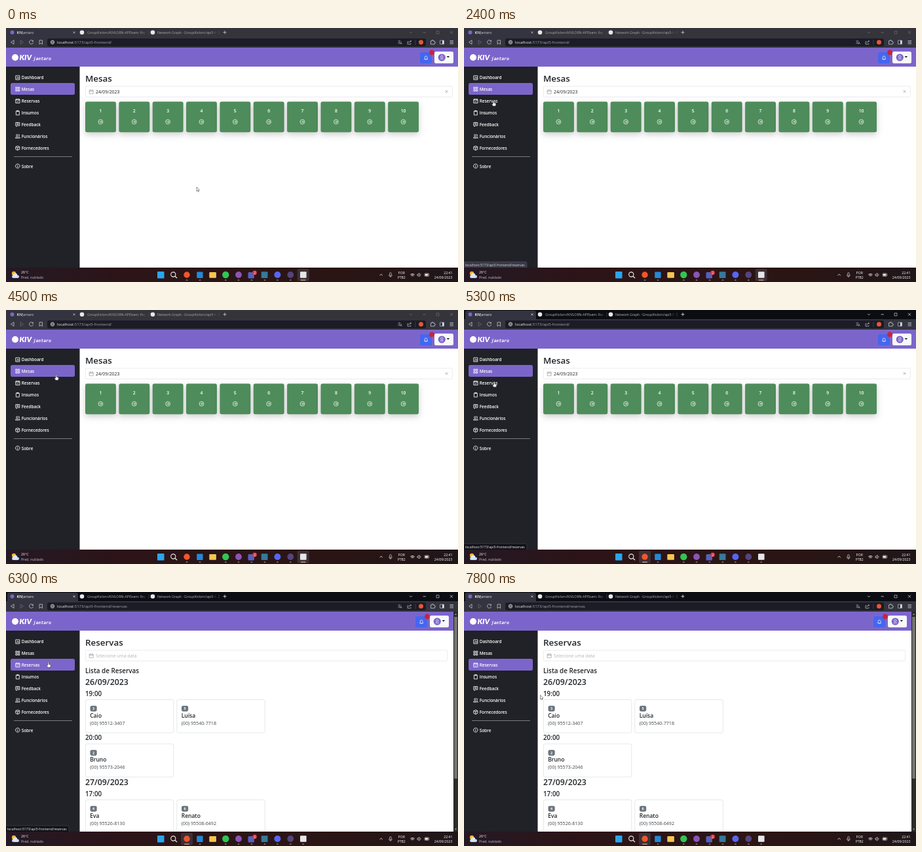
An HTML page with a canvas that plays this animation: 690 px wide and 388 px high, repeating every 8 s.

```html
<!DOCTYPE html>
<html lang="pt-BR">
<head>
<meta charset="utf-8">
<style>
html, body { margin: 0; width: 100%; height: 100%; overflow: hidden; background: #fff; }
canvas { display: block; width: 690px; height: 388px; }
</style>
</head>
<body>
<canvas id="stage"></canvas>
<script>
const W = 690, H = 388, LOOP = 8000, STEP = 100;
const PURPLE = '#7c65ca', DARK = '#212529', GREEN = '#4f8c5b';
const canvas = document.getElementById('stage');
const ratio = window.devicePixelRatio || 1;
canvas.width = W * ratio;
canvas.height = H * ratio;
const c = canvas.getContext('2d');

// Cursor path: time, x, y
const PATH = [
  [0, 291, 243], [400, 287, 224], [900, 272, 163], [1500, 27.5, 118], [1800, 21, 115],
  [2400, 45, 111], [3200, 45, 111], [3600, 129.5, 106.5], [4000, 148, 117], [4200, 148, 117],
  [4500, 76.5, 99], [5100, 46, 109.5], [5300, 46, 109.5], [5600, 64.5, 107], [6300, 64.5, 107],
  [7100, 158, 142], [7800, 116.5, 157.5]
];

const MENU = [
  ['Dashboard', 'M.5 1h6v6h-6zM2 5.5v-1M3.5 5.5v-3M5 5.5v-2'],
  ['Mesas', 'M.5.5h2.3v2.3H.5zM4.2.5h2.3v2.3H4.2zM.5 4.2h2.3v2.3H.5zM4.2 4.2h2.3v2.3H4.2z'],
  ['Reservas', 'M.5 1h6.2v5.7H.5zM.5 2h6.2M2 0v1M5 0v1M2.2 4.2l1 1 1.8-1.8'],
  ['Insumos', 'M1 1h5v6H1zM2.3.4h2.4v1H2.3z'],
  ['Feedback', 'M.5.5h6v4.7H3L1.5 6.8V5.2h-1zM2 2h3M2 3.5h3'],
  ['Funcionários', 'M2.5 3a1.2 1.2 0 1 0-.01 0M.3 6.3q0-2.2 2.2-2.2t2.2 2.2zM5 3a1.1 1.1 0 1 0-.4-2.1M5.3 4.1q1.6.2 1.6 2.2H5.5'],
  ['Fornecedores', 'M3.5.3l3 1.3v3.8l-3 1.4-3-1.4V1.6zM.5 1.6l3 1.3 3-1.3M3.5 2.9v3.9'],
  ['Sobre', 'M3.5.3a3.2 3.2 0 1 0 .01 0M3.5 3v2.3M3.5 1.7v.6']
].map(([label, d], i) => ({ label, icon: new Path2D(d), y: i === 7 ? 211 : 75.5 + i * 18 }));

const BOOKINGS = [
  [121, 164.5, 3, 'Caio', '(00) 95512-3407'], [260.5, 164.5, 5, 'Luísa', '(00) 95540-7718'],
  [121, 232, 2, 'Bruno', '(00) 95573-2046'],
  [121, 317.5, 4, 'Eva', '(00) 95526-8130'], [260.5, 317.5, 6, 'Renato', '(00) 95508-6492']
];

const ICONS = {
  calendar: new Path2D('M0 1h6v5.4H0zM0 2.8h6M1.6 0v1.6M4.4 0v1.6'),
  back: new Path2D('M4.5 0v6L0 3z'),
  forward: new Path2D('M0 0v6l4.5-3z'),
  reload: new Path2D('M5.7 1.5A3 3 0 1 0 6 3.6M5.9 0v1.8H4'),
  bookmark: new Path2D('M0 0h4.5v6L2.2 4.3 0 6z'),
  share: new Path2D('M1.5 2H0v4h5V4.5M2 4q.3-2.5 3.5-2.7M4.2 0l1.5 1.3-1.5 1.3'),
  puzzle: new Path2D('M0 1.5h1.7a1 1 0 1 1 1.8 0h2v1.7a1 1 0 1 1 0 1.6v1.7H0z'),
  bell: new Path2D('M0 5.2l.8-1V2.4a1.9 1.9 0 0 1 3.8 0v1.8l.8 1zM2 6h1.5'),
  hand: new Path2D('M-.9 0Q0-.7.8 0V3.3L3.6 4Q4 4.3 3.9 5.2L3.2 8.3H-.7L-2.6 5.4Q-2.6 4.4-.9 5.3z'),
  arrow: new Path2D('M0 0V6.4L1.5 5.1 2.5 7.3 3.5 6.8 2.5 4.8H4.4z')
};

function rect(x, y, w, h, fill, r = 0, stroke) {
  c.beginPath();
  c.roundRect(x, y, w, h, r);
  if (fill) { c.fillStyle = fill; c.fill(); }
  if (stroke) { c.strokeStyle = stroke; c.lineWidth = .6; c.stroke(); }
}

function dot(x, y, r, fill) {
  c.beginPath();
  c.arc(x, y, r, 0, 7);
  c.fillStyle = fill;
  c.fill();
}

function ring(x, y, r, color, width = .7) {
  c.beginPath();
  c.arc(x, y, r, 0, 7);
  c.strokeStyle = color;
  c.lineWidth = width;
  c.stroke();
}

function text(s, x, y, size, color, { weight = 400, align = 'left', family = '"Open Sans", sans-serif' } = {}) {
  c.font = `${weight} ${size}px ${family}`;
  c.textAlign = align;
  c.fillStyle = color;
  c.fillText(s, x, y);
  return x + c.measureText(s).width;
}

function line(color, width, ...p) {
  c.beginPath();
  for (let i = 0; i < p.length; i += 2) c.lineTo(p[i], p[i + 1]);
  c.strokeStyle = color;
  c.lineWidth = width;
  c.stroke();
}

function cross(x, y, r, color) {
  line(color, .7, x - r, y - r, x + r, y + r);
  line(color, .7, x + r, y - r, x - r, y + r);
}

function icon(path, x, y, color, { fill, width = .7 } = {}) {
  c.save();
  c.translate(x, y);
  if (fill) { c.fillStyle = fill; c.fill(path); }
  c.strokeStyle = color;
  c.lineWidth = width;
  c.stroke(path);
  c.restore();
}

function clippedText(s, x, width, color, bg) {
  c.save();
  c.beginPath();
  c.rect(x, 0, width, 14);
  c.clip();
  text(s, x, 8.8, 5.2, color);
  const fade = c.createLinearGradient(x + width - 8, 0, x + width, 0);
  fade.addColorStop(0, bg + '00');
  fade.addColorStop(1, bg);
  rect(x + width - 8, 0, 8, 14, fade);
  c.restore();
}

function drawBrowser(focused, url) {
  const strip = focused ? '#0c0c13' : '#35343a', bar = '#33343f';
  const bright = focused ? '#f2f2f5' : '#d4d4da', dim = focused ? '#b9b9c2' : '#a9a9b0';
  rect(0, 0, W, 14, strip);
  rect(2, 1, 108, 13, bar, [3, 3, 0, 0]);
  dot(9.5, 6.7, 3, PURPLE);
  text('jantaro', text('KIV', 16.5, 8.8, 5.2, bright, { weight: 700 }), 8.8, 5.2, bright);
  cross(104, 6.8, 1.5, bright);
  dot(116, 6.7, 3.3, '#e8e8ec');
  clippedText('GroupKivlorn/KIVLORN-API5sem: Repositório', 124, 90, dim, strip);
  dot(224, 6.7, 3.3, '#e8e8ec');
  clippedText('Network Graph · GroupKivlorn/api5-frontend', 231, 91, dim, strip);
  line('#55555f', .6, 218, 4, 218, 10);
  line('#55555f', .6, 325, 4, 325, 10);
  line(bright, .8, 331.5, 6.7, 336.5, 6.7);
  line(bright, .8, 334, 4.2, 334, 9.2);
  const ctl = focused ? '#e8e8ec' : '#77777e';
  line(ctl, .7, 616, 5.8, 618, 7.8, 620, 5.8);
  line(ctl, .7, 636.5, 6.8, 641, 6.8);
  rect(657, 4.8, 4, 4, null, 0, ctl);
  cross(680, 6.7, 2, ctl);

  rect(0, 14, W, 16, bar);
  icon(ICONS.back, 7.5, 18.7, '#d8d8de');
  icon(ICONS.forward, 22, 18.7, '#70707a');
  icon(ICONS.reload, 35.5, 18.6, '#d8d8de');
  icon(ICONS.bookmark, 51, 18.8, '#d8d8de');
  rect(63, 16, 578, 12, '#1b1c26', 2.5);
  ring(71, 21.7, 2.8, '#d8d8de');
  line('#d8d8de', .6, 68.2, 21.7, 73.8, 21.7);
  c.beginPath();
  c.ellipse(71, 21.7, 1.2, 2.8, 0, 0, 7);
  c.stroke();
  text(url, text('localhost', 78, 23.9, 6, '#f0f0f4'), 23.9, 6, '#a5a6b2');
  text('文', 598, 23.2, 4.6, '#c8c8d0', { family: '"Noto Sans CJK", "Noto Sans CJK JP", sans-serif' });
  text('A', 601.5, 25, 5, '#c8c8d0');
  icon(ICONS.share, 613, 18.8, '#c8c8d0');
  line('#555661', .6, 625, 18, 625, 26);
  dot(633.5, 21.8, 3.5, '#ee5430');
  icon(ICONS.puzzle, 648.5, 18.3, '#d8d8de');
  rect(662.5, 19, 6, 5.6, null, .5, '#d8d8de');
  rect(666, 19, 2.5, 5.6, '#d8d8de');
  for (let i = 0; i < 3; i++) line('#d8d8de', .8, 677.5, 19.6 + i * 2.2, 683, 19.6 + i * 2.2);
}

function drawHeader(right) {
  rect(0, 30, right, 29, PURPLE);
  dot(14, 45, 5, '#fff');
  text('KIV', 20.5, 49.3, 11.5, '#fff', { weight: 'italic 900', family: 'Lato, sans-serif' });
  text('jantaro', 41.5, 48.5, 6.5, '#fff', { weight: 'italic 700', family: '"DejaVu Sans Mono", monospace' });
  const x = right - W;
  rect(632 + x, 37, 18, 17, '#4566ee', 2.5);
  icon(ICONS.bell, 638.4 + x, 42.4, '#fff');
  dot(650 + x, 37.4, 3.8, '#c9243a');
  rect(654 + x, 36, 29, 18, '#f8f9fa', 2.5);
  dot(665.3 + x, 45, 5.6, PURPLE);
  ring(665.3 + x, 43.8, 1.7, '#fff');
  line('#fff', .7, 662.7 + x, 47.2, 668 + x, 47.2);
  c.beginPath();
  c.moveTo(672.6 + x, 43);
  c.lineTo(677.2 + x, 43);
  c.lineTo(674.9 + x, 45.5);
  c.fillStyle = DARK;
  c.fill();
}

function drawSidebar(active) {
  rect(0, 59, 112.5, 307, '#202227');
  MENU.forEach(({ label, icon: path, y }) => {
    if (label === active) rect(7, Math.floor(y - 9), 98, 18, PURPLE, 2.5);
    icon(path, 14.3, y - 3.6, '#fff', { width: .85 });
    text(label, 23.7, y + 2.6, 6.4, '#fff', { weight: 600 });
  });
  line('#a0a3a6', .7, 12, 196.5, 101, 196.5);
}

function drawPage(title, value, color, right) {
  text(title, 121, 82.1, 13.4, DARK, { weight: 600 });
  rect(121.3, 89, right - 121.3, 16.3, '#fff', 1.5, '#dedede');
  icon(ICONS.calendar, 127.2, 94, '#8c8c8c', { width: .6 });
  text(value, 137, 99.8, 6.85, color);
}

function drawTables() {
  drawPage('Mesas', '24/09/2023', '#222', 681.3);
  cross(672.5, 97, 1.8, '#8c8c8c');
  for (let i = 0; i < 10; i++) {
    const x = 121 + i * 51.35, mid = x + 23.4;
    c.save();
    c.shadowColor = 'rgba(0,0,0,.19)';
    c.shadowBlur = 10 * ratio;
    c.shadowOffsetY = 3.6 * ratio;
    rect(x, 112.6, 46.9, 46.7, GREEN, 2.8);
    c.restore();
    text(String(i + 1), mid, 128.7, 6.8, '#fff', { align: 'center', weight: 600 });
    ring(mid, 143.3, 3.4, '#fff', .75);
    line('#fff', .75, mid - 1.8, 143.3, mid + 1.7, 143.3);
    line('#fff', .75, mid + .2, 141.7, mid + 1.8, 143.3, mid + .2, 144.9);
  }
}

function drawBookings() {
  drawPage('Reservas', 'Selecione uma data', '#b5b5b5', 673.8);
  const head = (s, y, size) => text(s, 121, y, size, DARK, { weight: 600 });
  head('Lista de Reservas', 123.6, 9.9);
  head('26/09/2023', 142, 12.3);
  head('19:00', 158.7, 9.8);
  head('20:00', 225.8, 9.8);
  head('27/09/2023', 295, 12.3);
  head('17:00', 311.6, 9.8);
  for (const [x, y, table, name, phone] of BOOKINGS) {
    rect(x + .3, y, 134.5, 50.6, '#fff', 2.6, '#d6d7d8');
    rect(x + 7.5, y + 9.2, 10.2, 8.8, '#6c757d', 2.4);
    text(String(table), x + 12.6, y + 15.7, 5.4, '#fff', { weight: 700, align: 'center' });
    text(name, x + 7.2, y + 27.2, 8.5, DARK, { weight: 600 });
    text(phone, x + 7.2, y + 38.1, 7.15, '#42464a');
  }
  rect(683, 30, 7, 336, '#2c2c2c');
  rect(684.2, 38, 4.6, 247, '#777');
  for (const [y, d] of [[34, -1], [362.5, 1]]) {
    c.beginPath();
    c.moveTo(684.8, y - d);
    c.lineTo(688.2, y - d);
    c.lineTo(686.5, y + d);
    c.fillStyle = '#9a9a9a';
    c.fill();
  }
}

function drawTaskbar(browserActive) {
  const tint = c.createLinearGradient(0, 0, W, 0);
  tint.addColorStop(0, '#241924');
  tint.addColorStop(.25, '#2c1418');
  tint.addColorStop(.75, '#2a1514');
  tint.addColorStop(1, '#1f161a');
  rect(0, 366, W, 22, tint);
  dot(12, 375, 3.2, '#f3b23c');
  rect(9, 377.5, 11, 4.4, '#c3dbf5', 2.2);
  dot(14, 377.6, 3.2, '#d9e8f8');
  text('26°C', 23, 375.4, 5.2, '#fff');
  text('Pred. nublado', 23, 383, 5.2, '#c9c5c9');

  const active = browserActive ? 276 : 453.7;
  rect(active - 9, 368, 18, 18.5, '#3b3036', 2);
  rect(231, 372, 10.5, 10.5, '#2aa5ee', 1);
  ring(255.3, 376.5, 3.6, '#f1f1f1', 1.1);
  line('#f1f1f1', 1.2, 258, 379.2, 261, 382);
  dot(276, 377, 4.7, '#f1562b');
  rect(291.2, 372.6, 9.4, 9.4, '#2389d7', 1);
  rect(310.3, 373, 10.6, 8.8, '#f6c650', 1);
  dot(335.3, 377, 5.2, '#2fc653');
  dot(355, 377, 4.9, '#8a55b4');
  rect(369.5, 373, 9.4, 9.4, '#5560bd', 1.5);
  dot(379.6, 373.8, 3.4, '#d63a3f');
  text('2', 379.6, 375.6, 5, '#fff', { align: 'center' });
  rect(389.7, 372.3, 9.8, 9.8, '#35799b', 1);
  dot(414.4, 377, 5, '#5865f2');
  dot(434.3, 377, 4.9, '#54457e');
  rect(449, 372.2, 9.6, 9.6, '#e6e6ea', 1);
  for (const x of [276, 296, 335.3, 355, 375, 395, 414.4, 434.3, 453.7]) {
    const wide = x === active;
    rect(x - (wide ? 4 : 1.4), 384.4, wide ? 8 : 2.8, 1.3, wide ? '#e7a08d' : '#9c959b', .6);
  }

  line('#eee', .8, 570.5, 378.2, 572.7, 376, 574.9, 378.2);
  rect(585.6, 373.6, 2.6, 4.6, null, 1.3, '#eee');
  line('#eee', .6, 584.4, 377, 585.4, 379.3, 588.4, 379.3, 589.4, 377);
  line('#eee', .6, 586.9, 379.3, 586.9, 381);
  text('POR', 603.7, 375.7, 5.1, '#fff', { align: 'center' });
  text('PTB2', 603.7, 383.2, 5.1, '#fff', { align: 'center' });
  for (let r = 1.5; r < 5; r += 1.5) {
    c.beginPath();
    c.arc(620.5, 380, r, -2.36, -.78);
    c.strokeStyle = '#fff';
    c.lineWidth = .8;
    c.stroke();
  }
  line('#eee', .7, 628, 376, 629.3, 376, 631, 374.5, 631, 379.8, 629.3, 378.3, 628, 378.3, 628, 376);
  line('#eee', .6, 632.5, 375.6, 633.1, 377.1, 632.5, 378.6);
  rect(639.2, 375, 6.3, 4.2, null, .8, '#fff');
  rect(640, 375.8, 4.2, 2.6, '#fff');
  text('22:41', 681.5, 375.6, 5.2, '#fff', { align: 'right' });
  text('24/09/2023', 681.5, 383.2, 5.25, '#fff', { align: 'right' });
}

function bubbleAlpha(t) {
  if (t >= 1900 && t < 4000) return Math.min(1, (4100 - t) / 500);
  if (t >= 4800 && t < 7100) return Math.min(1, (7100 - t) / 300);
  return 0;
}

function drawBubble(t, focused) {
  c.globalAlpha = bubbleAlpha(t);
  rect(-1, 357, 97, 10, focused ? '#111118' : '#393a45', [0, 2, 0, 0], '#4a4a55');
  text('localhost:5173/api5-frontend/reservas', 2, 363.6, 5.1, focused ? '#f2f2f5' : '#d4d4da');
  c.globalAlpha = 1;
}

function cursorAt(t) {
  const i = PATH.findIndex(p => p[0] > t);
  if (i < 0) return PATH[PATH.length - 1].slice(1);
  const [t0, x0, y0] = PATH[i - 1], [t1, x1, y1] = PATH[i];
  const u = (t - t0) / (t1 - t0), k = u * u * (3 - 2 * u);
  return [x0 + (x1 - x0) * k, y0 + (y1 - y0) * k];
}

function drawCursor(t) {
  const [x, y] = cursorAt(t);
  if (x < 105) icon(ICONS.hand, x, y, '#222', { fill: '#fff', width: .6 });
  else icon(ICONS.arrow, x, y, '#444', { fill: '#fff', width: .6 });
}

function draw(now) {
  const t = Math.floor(now % LOOP / STEP) * STEP;
  const focused = t >= 5300, booking = t >= 5400;
  c.setTransform(ratio, 0, 0, ratio, 0, 0);
  rect(0, 0, W, H, '#fff');
  drawBrowser(focused, ':5173/api5-frontend/' + (booking ? 'reservas' : ''));
  drawHeader(booking ? 683 : W);
  drawSidebar(booking ? 'Reservas' : 'Mesas');
  if (booking) drawBookings();
  else drawTables();
  drawBubble(t, focused);
  drawTaskbar(t >= 5100);
  drawCursor(t);
}

const start = performance.now();
function tick() {
  draw(performance.now() - start);
  requestAnimationFrame(tick);
}
tick();
</script>
</body>
</html>
```
